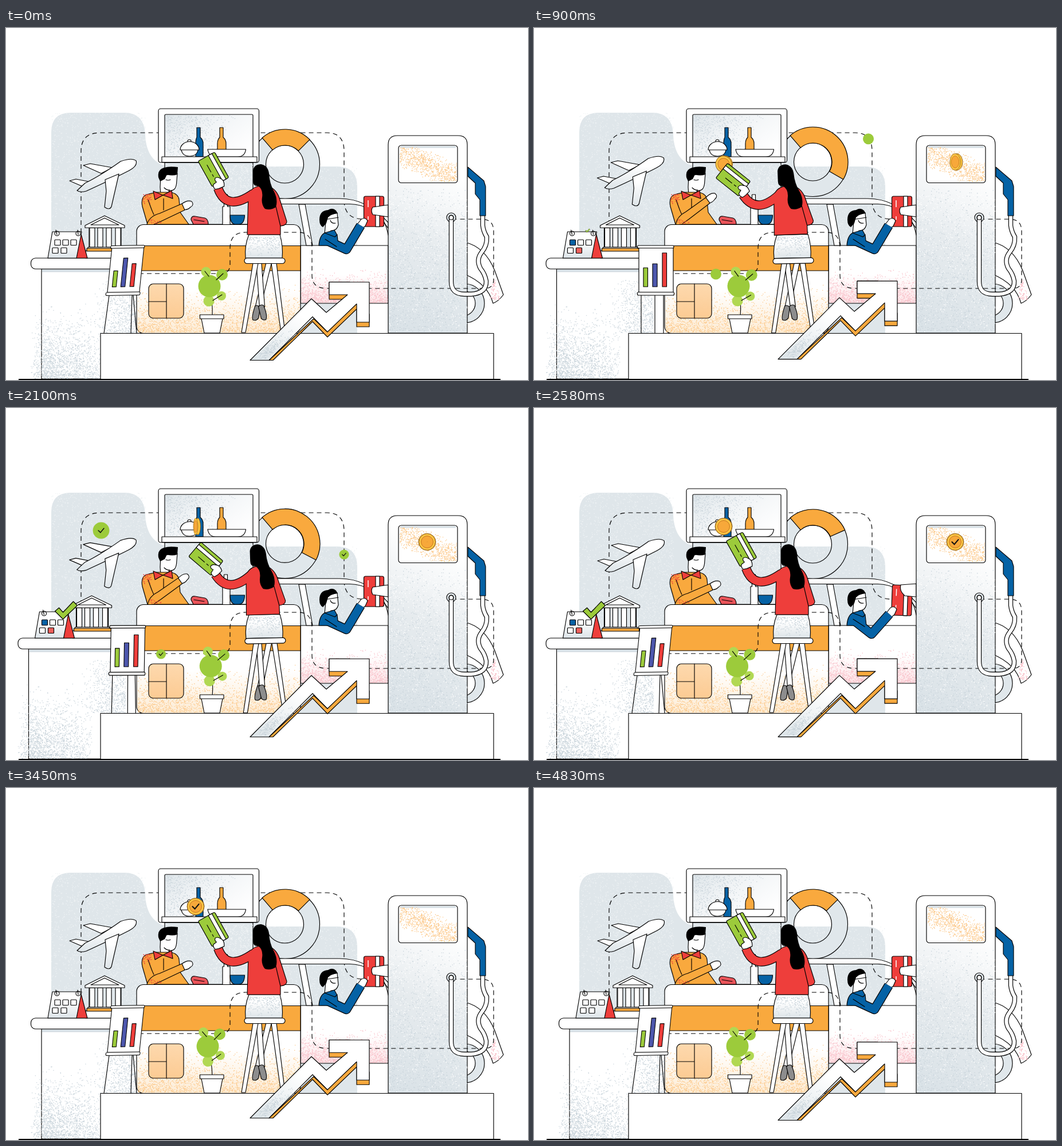
Animation, 911 px wide and 615 px high, one loop 4860 ms. Source, as an HTML page:

```html
<!DOCTYPE html>
<html lang="en">
<head>
<meta charset="utf-8">
<title>Cards and rewards</title>
<style>
html,body{margin:0;width:100%;height:100%;overflow:hidden;background:#fff}
svg{display:block;width:100vw;height:100vh}
.s{fill:#fff;stroke:#000;stroke-width:1.15;stroke-linejoin:round;stroke-linecap:round}
.n{fill:none}.g{fill:#e0e7eb}.or{fill:#f9a93e}.gr{fill:#9ccb3b}.re{fill:#ee3e3b}.bl{fill:#0562a5}.bk{fill:#000}
.dash{fill:none;stroke:#000;stroke-width:1.15;stroke-dasharray:8 6}
.limb{fill:none;stroke-linejoin:round}
.gold{stroke:#8a5a18;stroke-width:.9}
</style>
</head>
<body>
<svg viewBox="0 0 911 615" preserveAspectRatio="none">
<defs>
  <linearGradient id="fade" x1=".6" y1="0" x2=".4" y2="1"><stop offset=".15" stop-color="#fff"/><stop offset=".55" stop-color="#e6ebee"/><stop offset="1" stop-color="#dbe3e8"/></linearGradient>
  <linearGradient id="glass" x1="0" y1="0" x2="1" y2=".7"><stop offset="0" stop-color="#dfe6ea"/><stop offset=".45" stop-color="#f1f4f6"/><stop offset="1" stop-color="#fff"/></linearGradient>
  <linearGradient id="soft" x1="0" y1="0" x2="0" y2="1"><stop offset=".3" stop-color="#fff"/><stop offset="1" stop-color="#dde4e8"/></linearGradient>
  <linearGradient id="peach" x1="0" y1="0" x2="0" y2="1"><stop offset=".6" stop-color="#fff"/><stop offset="1" stop-color="#fdecd5"/></linearGradient>
  <linearGradient id="chip" x1="0" y1="0" x2="0" y2="1"><stop offset="0" stop-color="#fdd9ae"/><stop offset="1" stop-color="#fccb93"/></linearGradient>
  <linearGradient id="pink" x1="0" y1="0" x2="0" y2="1"><stop offset=".5" stop-color="#fff"/><stop offset="1" stop-color="#fde6e9"/></linearGradient>
  <linearGradient id="steel" x1="0" y1="1" x2="1" y2="0"><stop offset="0" stop-color="#dbe3e7"/><stop offset=".5" stop-color="#fff"/></linearGradient>
</defs>
<g id="back">
  <path fill="#dfe6ea" d="M79 410V182Q79 148 113 148H207Q241 148 243 186C244 222 262 242 290 242H578Q612 242 613 276V533H79Z"/>
</g>
<path class="dash" d="M131 400V215Q131 183 165 183H560Q590 183 590 215V300Q590 334 624 334"/>
<path id="railA" fill="none" d="M500 183H556Q590 183 590 217V256"/>
<g id="dotA"></g>

<g id="plane">
  <path class="s" d="M166 254L135 240L147 237L186 244Z"/>
  <path class="s" d="M111 267L122 264L148 269L134 277Z"/>
  <path class="s" style="fill:url(#soft)" d="M227 232Q230 241 215 249Q190 262 140 285Q130 288 124 284L138 271Q165 258 200 233Q220 226 227 232Z"/>
  <path class="s" style="fill:url(#soft)" d="M173 265L197 255L184 312Q181 319 172 313L175 285Z"/>
</g>
<g id="tick"></g>

<g id="donut">
  <path class="s g" fill-rule="evenodd" d="M426.500 238a60.500 60.500 0 1 0 121 0a60.500 60.500 0 1 0 -121 0M453.500 238a33 33 0 1 1 66 0a33 33 0 1 1 -66 0"/>
  <path id="share" class="s or"/>
</g>

<g id="cabinet">
  <path class="s g" d="M277 235H431V343H277Z"/>
  <rect class="s" x="266" y="141" width="175.500" height="94" rx="4"/>
  <rect class="s" style="fill:url(#glass)" x="277" y="151" width="154" height="76" rx="2"/>
</g>
<g>
  <path class="s bl" d="M333 174H339V191Q344 195 344 202V225H331V202Q331 195 333 191Z"/>
  <path class="s or" d="M373 174H379V191Q384 195 384 202V218H369V202Q369 195 373 191Z"/>
  <circle class="s" cx="320" cy="198" r="3"/>
  <path class="s" d="M304 213A16.500 14.500 0 0 1 337 213ZM306 213Q308 224 320 224Q333 224 335 213Z"/>
  <path class="s" d="M352 212H418.500Q417 225 404 225H366Q354 225 352 212Z"/>
  <rect class="s" x="272" y="225" width="166" height="9.500"/>
</g>

<g id="man">
  <path class="s" d="M270 258L299 254L297.500 272Q296 286 284 284L286 292L270 292L269 278Z"/>
  <path class="bk" d="M266 261Q264 247 276 244Q285 241 300 243L299 256Q290 259 281 256L277 264L269 268Z"/>
  <path class="s n" d="M279 265Q283 267 287 265M276 279Q281 284 286 283"/>
  <path class="s or" d="M247 343L238 312Q234 293 249 290L262 287H288Q301 290 302 300L304 322L319 343Z"/>
  <path class="s n" d="M275 298V318M248 300Q254 318 258 326"/>
  <path class="s re" d="M274 292L257 285L260 300ZM274 292L289 284L291 298Z"/>
  <g id="manArm">
    <path class="s" d="M306 308Q316 300 324 303Q329 309 322 313Q316 319 308 317Z"/>
    <path class="s or" d="M246 343Q250 329 268 324L307 307L312 318L270 338L258 343"/>
  </g>
</g>
<g id="shelfCoin"></g>

<g id="car">
  <path class="s" style="fill:url(#pink)" d="M514 380H667V481H514Z"/>
  <path class="s" d="M470 298H580Q630 297 667 340V350Q640 308 600 307.500H470Z"/>
  <path class="s" d="M511 308H522L535 380H524Z"/>
  <path class="s n" d="M658 336Q664 345 667 362"/>
</g>
<g id="driver">
  <path class="s" d="M559 328L578 323L580 344Q577 355 567 354V360H556Z"/>
  <path class="bk" d="M547 335Q547 319 562 318Q570 313 576 319L579 324Q567 325 562 331L559 341L553 348Q547 345 547 335Z"/>
  <path class="s n" d="M561 334L580 331M566 336Q568 342 575 341"/>
  <g id="cardRed">
    <rect class="s re" x="624.500" y="294" width="35" height="53" rx="3"/>
    <path class="s" d="M645 294H652V347H645Z"/>
    <path d="M632 301V313M632 329V335" stroke="#fff" stroke-width="1.500"/>
  </g>
  <path id="grip" class="s"/>
  <path id="palm" class="s" d="M613 343L620 334Q628 330 631 337L627 346L620 352Z"/>
  <path class="limb sleeve" stroke="#000" stroke-width="16.300"/>
  <path class="s bl" d="M546 380Q547 363 556 358L573 353L578 362L580 380Z"/>
  <path class="limb sleeve" stroke="#0562a5" stroke-width="14"/>
  <path class="s n" d="M556 358L574 365L578 361M557 369L577 382"/>
</g>

<g id="rear">
  <circle class="s g" cx="801" cy="481" r="34"/><circle class="s" cx="797" cy="481" r="22"/>
  <path class="s" d="M800 374Q836 382 853 424L868 466Q860 477 850 481Q841 447 800 430Z"/>
</g>
<g id="pump">
  <path class="s" style="fill:url(#fade)" d="M667 533V204Q667 188 683 188H789Q805 188 805 204V533Z"/>
  <rect class="s" x="685" y="205" width="103" height="65.500" rx="5"/>
  <path d="M688 208H785" stroke="#d5dfe5" stroke-width="3"/>
</g>
<g id="pumpCoin"></g>

<g id="desk">
  <path class="s" d="M62 613V421H260V613Z"/>
  <path d="M63 424H240" stroke="#d5dee4" stroke-width="5"/>
  <g id="deskGrain"></g>
  <rect class="s" x="43.500" y="402" width="216" height="19" rx="8"/>
  <path class="s g" d="M145 347H201V385H145Z"/>
  <path class="s" d="M146 349h9v34h-9zM160 349h9v34h-9zM175 349h9v34h-9zM191 349h9v34h-9z"/>
  <path class="s" d="M138 349V345L172 328L207 345V349ZM148 344L172 332L197 344Z"/>
  <path class="s" d="M143 383H203V389H143ZM139 389H207V402H139Z"/>
  <path class="s or" d="M141 385H206V390H141Z"/>
  <path class="s re" d="M130 356L142 402H123Z"/>
  <path class="s" style="fill:url(#soft)" d="M81 356H132L123 402H73Z"/>
  <circle class="s n" cx="89" cy="359" r="4"/><circle class="s n" cx="126" cy="359" r="4"/>
  <path class="s n" d="M89 361L87 353M126 361L125 353"/>
  <g id="days"></g>
  <path id="bigTick" class="s gr" d="M108 355L115 349L122 357L140 338L147 345L122 369Z"/>
</g>

<g id="counter">
  <rect class="s" style="fill:url(#peach)" x="228" y="343.500" width="286" height="190" rx="12"/>
  <path class="s or" d="M228 380.500H514V424H228Z"/>
  <g id="counterGrain"></g>
  <rect class="s" style="fill:url(#chip)" x="249" y="447" width="61" height="60" rx="8"/>
  <path class="s n" d="M280 447V507M249 478H280"/>
</g>
<path class="dash" d="M232 429H375Q391 429 391 413V385Q391 357 418 357H510Q534 357 534 385V432Q534 455 560 455H835Q851 455 851 440V355Q851 334 830 334H785"/>
<g id="dotB"></g>

<path class="s g" d="M785 331a8 8 0 1 0 -16 0a8 8 0 1 0 16 0"/>
<g fill="none" stroke-linecap="round">
  <path class="hose" stroke="#000" stroke-width="8.300"/>
  <path class="hose" stroke="#fff" stroke-width="6"/>
</g>
<circle class="s n" cx="777" cy="331" r="4"/>
<path class="s bl" d="M806 243L834 267L837 277V328H827V300L819 290V271L806 259Z"/>

<path class="s" d="M380.500 291H386.500V312H391V343.500H378V312H380.500Z"/>
<path class="s bl" d="M391 327H416.500Q416 343 406 343H399Q391 341 391 327Z"/>
<path class="s" style="fill:#ea555a" d="M323 335Q323 328 330 329L347 332Q353 334 353 343H327Z"/>
<path class="s n" d="M328 335L346 338"/>

<path id="legs" class="s n"/>
<g id="easel">
  <rect class="s" x="183" y="384" width="60" height="78"/>
  <rect class="s" x="180.500" y="380" width="63.500" height="4.500" rx="2"/>
  <rect class="s" x="180.500" y="461.500" width="64" height="5.500" rx="2"/>
  <rect id="bar0" class="s gr" x="191" width="7.500"/>
  <rect id="bar1" class="s" style="fill:#4d57ad" x="207" width="8"/>
  <rect id="bar2" class="s re" x="224" width="7.500"/>
</g>

<g id="plant">
  <path class="s n" d="M360 502Q361 480 356 455"/>
  <g fill="#b1d853"><circle cx="349" cy="426" r="8.500"/><circle cx="376" cy="468" r="8"/><circle cx="354" cy="477" r="9.500"/></g>
  <circle class="gr" cx="377" cy="431" r="10"/><circle class="gr" cx="355" cy="451" r="19.500"/>
  <path class="s n" d="M347 425L354 434M379 429L367 440M377 466L361 476"/>
</g>
<path class="s" d="M341 508H378L373 533H346ZM338.500 501H380V508H338.500Z"/>

<g id="woman">
  <path class="limb legA" stroke="#000" stroke-width="10.300"/><path class="limb legA" stroke="#fff" stroke-width="8"/>
  <path class="limb legB" stroke="#000" stroke-width="10.300"/><path class="limb legB" stroke="#fff" stroke-width="8"/>
  <path id="shoeA" class="s" style="fill:#8d8d8d" d="M-4 -12Q0 -15 5 -11L5 8Q2 14 -4 13Q-8 10 -4 -12Z"/>
  <path id="shoeB" class="s" style="fill:#8d8d8d" d="M-5 -11Q0 -15 4 -12Q9 6 5 13Q0 15 -3 10Z"/>
  <g id="stool">
    <path class="s" d="M431 411L411 532H418L440 411ZM463 411L480 532H487L472 411Z"/>
    <path class="s" style="fill:url(#soft)" d="M424 361H478Q484 382 482 402H418Q416 380 424 361Z"/>
    <rect class="s" x="416" y="402" width="71" height="9.500" rx="4.700"/>
  </g>
  <path class="limb arm" stroke="#000" stroke-width="16.300"/>
  <g class="lean">
    <path class="s re" d="M421 361L423 292Q427 279 442 276H458Q473 282 478 300L490 338Q490 345 479 346V361Z"/>
    <path class="s n" d="M471 312L479 346"/>
  </g>
  <path class="limb arm" stroke="#ee3e3b" stroke-width="14"/>
  <path class="lean bk" d="M431 267V249Q433 238 445 238Q457 240 459 254Q460 272 468 286Q475 300 471 313Q462 319 452 316Q445 308 447 296Q449 282 440 276Q431 277 431 267Z"/>
  <g id="cardGreen">
    <rect class="s gr" x="-25.500" y="-16.500" width="51" height="33" rx="2.500"/>
    <path class="s" d="M-25.500 -11H25.500V-4H-25.500Z"/>
    <path class="s n" d="M-12 6H2M7 6H11"/>
    <path class="s" d="M34 8L35 -2Q26 -8 20 -3Q14 0 15 5Q18 8 22 6L23 13Q28 16 32 14Z"/>
  </g>
</g>

<path class="s" d="M165 533.500H851V613.500H165Z"/>
<g id="arrow">
  <path class="s or" d="M459 580.500H466L535 513L561 540L612 491V522H634V500L600 444H564V474H590L561 531L537 508Z"/>
  <path class="s" style="fill:url(#steel)" d="M426 580.500L533 473L559 497L596 466H564V444H634V514H612V482L561 531L535 504.500L459 580.500Z"/>
</g>
<path d="M22 614H863" stroke="#000" stroke-width="2"/>
</svg>
<script>
const LOOP = 4860;
const $ = id => document.getElementById(id);
const mix = (a, b, p) => a + (b - a) * p;
const set = (id, m) => $(id).setAttribute('transform', m);
const shape = (cls, d) => document.querySelectorAll('.' + cls).forEach(e => e.setAttribute('d', d));

let seed = 7;
const rnd = () => (seed = (seed * 16807) % 2147483647) / 2147483647;

// Scatter tiny specks in a box; dens(u, v) is the chance to keep one.
function grain(id, x, y, w, h, n, color, dens) {
  let d = '';
  while (n--) {
    const u = rnd(), v = rnd();
    if (rnd() < dens(u, v)) d += `M${(x + u * w).toFixed(1)} ${(y + v * h).toFixed(1)}h1.3v1.3h-1.3z`;
  }
  const p = document.createElementNS('http://www.w3.org/2000/svg', 'path');
  p.setAttribute('d', d);
  p.setAttribute('fill', color);
  $(id).appendChild(p);
}
const GREY = '#c9d4db', PEACH = '#fcc98b';
grain('back', 79, 148, 164, 235, 4200, '#eef2f4', (u, v) => .35 + .5 * u * v);
grain('back', 440, 242, 172, 140, 1500, '#eef2f4', () => .6);
grain('cabinet', 278, 152, 150, 70, 1500, GREY, (u, v) => Math.max(0, .9 - u - .3 * v));
grain('cabinet', 278, 237, 152, 104, 1600, '#f3f6f7', u => .3 + .6 * u);
grain('man', 238, 290, 16, 18, 75, '#ee3e3b', (u, v) => 1 - .7 * v);
grain('man', 250, 334, 22, 8, 40, '#ee3e3b', u => 1 - u);
grain('car', 515, 415, 151, 64, 4200, '#f9c3cb', (u, v) => v * v * .9);
grain('rear', 842, 430, 20, 44, 250, '#f7b4be', (u, v) => v > .2 && u > .5 - v * .4 && u < .5 + v * .5 ? .7 : 0);
grain('pump', 668, 280, 136, 250, 2600, GREY, (u, v) => .15 + .55 * v * (1.1 - .4 * u));
grain('pump', 668, 290, 136, 240, 1500, '#fff', (u, v) => .8 - .5 * v);
grain('pump', 687, 208, 99, 60, 2200, PEACH, (u, v) => Math.max(0, 1 - Math.abs(v - .15 - .75 * u) * 2.2) * .8);
grain('deskGrain', 42, 470, 130, 142, 9000, GREY, (u, v) => v * v * (u < .16 ? u * 4 : 1.2 - u));
grain('deskGrain', 150, 440, 80, 93, 2400, GREY, (u, v) => u * .8 * (.4 + v * .6));
grain('counterGrain', 230, 440, 282, 91, 8500, PEACH, (u, v) => v * v * (.5 + .7 * Math.abs(u - .5)));
grain('stool', 422, 364, 56, 35, 500, GREY, (u, v) => (1 - v) * .8);
grain('arrow', 440, 525, 62, 52, 1700, GREY, (u, v) => Math.abs(u + v - 1.02) < .2 ? .6 * v : 0);

const tick = (k, w) => `<path d="M${-4 * k} 0L${-k} ${3 * k}L${4 * k} ${-3 * k}" fill="none" stroke="#111" stroke-width="${w}" stroke-linecap="round" class="mark"/>`;
for (const id of ['shelfCoin', 'pumpCoin'])
  $(id).innerHTML = '<ellipse class="edge gold" fill="#fbc43f" ry="14.500"/><g class="flip">' +
    '<circle class="gold" fill="#fcc544" r="14.500"/><circle r="10.500" fill="#f7a83a" stroke="#c8781f"/></g>' + tick(1.4, 2);
for (const id of ['dotA', 'dotB']) $(id).innerHTML = '<circle class="gr" r="9.500"/>' + tick(1, 1.5);
$('tick').innerHTML = '<circle class="gr" r="16"/>' + tick(1.5, 2);
$('days').innerHTML = [[85, 370], [99, 370], [113, 370], [81, 384], [96, 384]]
  .map(([x, y]) => `<rect class="s" x="${x}" y="${y}" width="10" height="9.500" rx="1"/>`).join('');
shape('hose', 'M777 331V443Q777 465 800 465H812Q839 463 838 442Q836 430 828 420Q820 405 830 392Q840 380 839 365Q833 355 832 345V328');

// Eased value through [time, value] stops.
function key(t, ...k) {
  if (t <= k[0][0]) return k[0][1];
  for (let i = 1; i < k.length; i++) {
    const [a, x] = k[i - 1], [b, y] = k[i];
    if (t < b) return mix(x, y, (1 - Math.cos(Math.PI * (t - a) / (b - a))) / 2);
  }
  return k[k.length - 1][1];
}
// Goes up between a and b, back down between c and d.
const hold = (t, a, b, c, d) => key(t, [a, 0], [b, 1], [c, 1], [d, 0]);

function coin(id, x, y, size, turn, mark, tilt = 0) {
  const g = $(id), c = Math.abs(Math.cos(turn)), thick = 4 * Math.abs(Math.sin(turn));
  set(id, `translate(${x} ${y}) rotate(${tilt}) scale(${size})`);
  const edge = g.querySelector('.edge');
  edge.setAttribute('cx', thick);
  edge.setAttribute('rx', 14.5 * c + .5);
  g.querySelector('.flip').setAttribute('transform', `scale(${Math.max(.05, c)} 1)`);
  g.querySelector('.mark').setAttribute('transform', `scale(${mark})`);
}

function badge(id, x, y, size, mark) {
  set(id, `translate(${x} ${y}) scale(${size})`);
  $(id).querySelector('.mark').setAttribute('transform', `scale(${mark})`);
}

function sector(from, to, R, r) {
  const pt = (deg, q) => `${487 + q * Math.cos(deg * Math.PI / 180)} ${238 + q * Math.sin(deg * Math.PI / 180)}`;
  const big = to - from > 180 ? 1 : 0;
  return `M${pt(from, R)}A${R} ${R} 0 ${big} 1 ${pt(to, R)}L${pt(to, r)}A${r} ${r} 0 ${big} 0 ${pt(from, r)}Z`;
}

function draw(t) {
  // desk and calendar
  set('desk', `translate(${-22.5 * hold(t, 60, 780, 2690, 3290)} 0)`);
  const days = $('days').children, on = t > 640 && t < 2950;
  days[0].style.fill = on ? '#0562a5' : '#fff';
  days[4].style.fill = on ? '#f0605c' : '#fff';
  const b = hold(t, 800, 1130, 2720, 3000);
  set('bigTick', `translate(113 354) scale(${b}) translate(-113 -354)`);

  // easel
  const e = hold(t, 100, 800, 1950, 2500);
  set('easel', `translate(212 382) skewX(${mix(-6.8, 0, e)}) rotate(${mix(-1, 0, e)}) scale(${mix(.93, 1, e)} 1) translate(-212 -382)`);
  $('legs').setAttribute('d', [[180, 171, 187, 187], [220, 218, 211, 211], [222, 228, 226, 226]]
    .map(([a, b, c, d]) => `M${mix(a, c, e)} 467L${mix(b, d, e)} 533`).join(''));
  [[28, 33], [50, 40], [40, 59]].forEach(([lo, hi], i) => {
    const h = mix(lo, hi, e);
    $('bar' + i).setAttribute('y', 452 - h);
    $('bar' + i).setAttribute('height', h);
  });

  // plane, arrow, plant
  const fly = key(t, [100, 0], [850, 1], [1650, .8], [2450, 0]);
  set('plane', `translate(${-.7 * fly} ${-5 * fly})`);
  set('arrow', `translate(0 ${-6 * Math.sin(Math.PI * t / LOOP) ** 2})`);
  const sway = key(t, [0, 0], [1620, 3.6], [3330, -3.2], [LOOP, 0]);
  set('plant', `rotate(${sway} 360 505)`);

  // donut
  const grow = hold(t, 150, 880, 2000, 2900);
  set('donut', `translate(0 ${key(t, [100, 0], [850, -4], [1650, -2], [2450, 0])})`);
  $('share').setAttribute('d', sector(-131, mix(-45, 30, grow), 61, 33));

  // bartender
  const p = hold(t, 100, 760, 2000, 2520);
  set('manArm', `rotate(${-12 * p} 252 336)`);

  // customer
  document.querySelectorAll('.lean').forEach(n => n.setAttribute('transform', `rotate(${-2.2 * p} 450 405)`));
  set('stool', `translate(${p} 0) rotate(${-1.2 * p} 451 406)`);
  shape('arm', `M${mix(432, 427, p)} ${mix(289, 292, p)}Q${mix(385, 388, p)} ${mix(322, 327, p)} ${mix(370, 365, p)} ${mix(280, 292, p)}`);
  set('cardGreen', `translate(${mix(362, 347.5, p)} ${mix(247, 265, p)}) rotate(${mix(61, 38.5, p)})`);
  const a = key(t, [100, 437], [900, 440], [1650, 446], [2500, 437]);
  const c = key(t, [100, 447], [900, 452], [1650, 447.5], [2500, 447]);
  shape('legA', `M460 405L${a + 2} 490`);
  shape('legB', `M441 405L${c} 488`);
  set('shoeA', `translate(${a} 498) rotate(8)`);
  set('shoeB', `translate(${c} 497) rotate(-8)`);

  // driver
  const d = hold(t, 2150, 2540, 2680, 3250);
  shape('sleeve', `M557 370L${mix(594, 589, d)} ${mix(387, 395, d)}L${mix(619, 620, d)} ${mix(345, 360, d)}`);
  set('palm', `translate(${2 * d} ${15 * d})`);
  set('cardRed', `translate(0 ${15.5 * d}) rotate(${2 * d} 642 320)`);
  $('grip').setAttribute('d', `M667 ${mix(309, 307, d)}L640 ${mix(313, 309, d)}Q${mix(636, 637, d)} 319 ${mix(640, 647, d)} ${mix(326, 328, d)}L667 330Z`);

  // coins
  const drop = key(t, [3520, 0], [4160, 1], [4360, 1.18]);
  const y = key(t, [700, 262], [900, 238], [1400, 207]) + 125 * drop;
  const spin = key(t, [860, 6.6], [1650, 4.1], [2500, 0]);
  const flat = key(t, [3600, 0], [4140, .55]);
  coin('shelfCoin', 331, y, t > 690 && t < 4350 ? 1 : 0, t < 3000 ? spin : flat,
    hold(t, 2800, 3100, 3550, 3750), key(t, [900, -25], [1400, 0], [3600, 0], [4140, 25]));
  coin('pumpCoin', 735, 234, hold(t, 520, 820, 2900, 3200), key(t, [560, 9.27], [1600, 2 * Math.PI]),
    key(t, [2050, 0], [2350, 1]));

  // dots on the dashed lines
  const run = key(t, [500, 0], [1230, 1]);
  const size = hold(t, 500, 760, 2050, 2300), mark = hold(t, 1230, 1500, 2050, 2300);
  const rail = $('railA'), q = rail.getPointAtLength(rail.getTotalLength() * run * 1);
  badge('dotA', q.x, q.y, size, mark);
  badge('dotB', mix(352, 270.5, key(t, [540, 0], [1340, 1])), 430, size, mark);
  badge('tick', 166, 214, hold(t, 1230, 1500, 2050, 2300), mark);
}

function frame() {
  draw(performance.now() % LOOP);
  requestAnimationFrame(frame);
}
frame();
</script>
</body>
</html>
```
